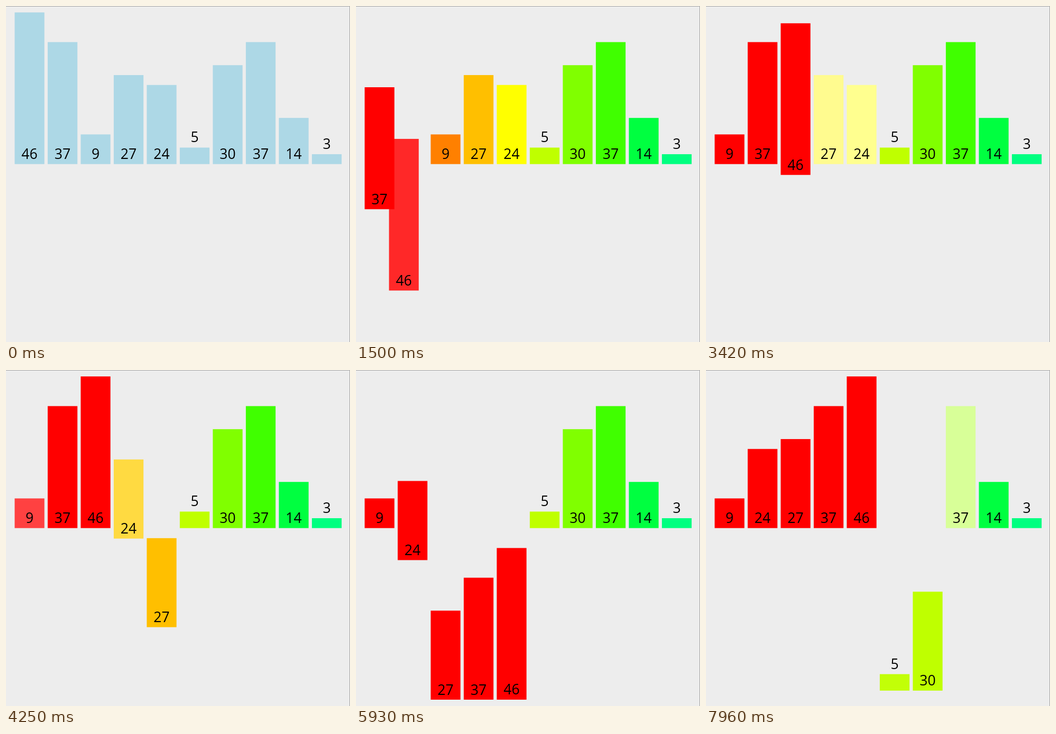
Animation of 651 by 637 pixels, one loop 7990 ms. Source, as an HTML page:

```html
<!DOCTYPE html>
<html lang="en">
<head>
<meta charset="utf-8">
<title>Merge sort</title>
<style>
  html, body { margin: 0; width: 100%; height: 100%; overflow: hidden; background: #ededed; }
  svg { display: block; width: 651px; height: 637px; }
  text { font: 26.5px "Open Sans", "Noto Sans", sans-serif; text-anchor: middle; fill: #000; }
</style>
</head>
<body>
<svg id="stage" viewBox="0 0 651 637">
  <path d="M0 .5H650.5V637" fill="none" stroke="#a3a3a3"/>
</svg>
<script>
const LOOP = 7990, EASE_TIME = 275;
const LEFT = 16.4, PITCH = 62.5, WIDTH = 56.25, UNIT = 6.25, BASE = 299.7, DROP = 325.3;
const values = [46, 37, 9, 27, 24, 5, 30, 37, 14, 3];

const svg = document.getElementById('stage');
function add(parent, name, attrs) {
  const el = document.createElementNS('http://www.w3.org/2000/svg', name);
  for (const key in attrs) el.setAttribute(key, attrs[key]);
  return parent.appendChild(el);
}

const bars = values.map((value, i) => {
  const height = value * UNIT;
  const group = add(svg, 'g', {});
  const rect = add(group, 'rect', { y: -height, width: WIDTH, height });
  const label = add(group, 'text', { x: WIDTH / 2, y: value < 6 ? -height - 10 : -9.5 });
  label.textContent = value;
  return { group, rect, slot: i, down: false, hue: null, glow: false, keys: [] };
});

// Fully saturated colour, lightened when highlighted
function colour({ hue, glow }) {
  if (hue === null) return [173, 216, 230];
  return [0, 240, 120].map(shift => {
    const k = ((hue + shift) % 360) / 60;
    const c = 255 * Math.max(0, Math.min(1, Math.abs(k - 3) - 1));
    return Math.min(255, c + (glow ? 153 : 0));
  });
}

const pose = bar => [
  LEFT + PITCH * bar.slot,
  BASE + (bar.down ? DROP : 0),
  ...colour(bar)
];

const ease = p => p < .5 ? 4 * p ** 3 : 1 - 4 * (1 - p) ** 3;

function poseAt(bar, t) {
  let key = bar.keys[0];
  for (const next of bar.keys) if (next.time <= t) key = next;
  const k = ease(Math.max(0, Math.min(1, (t - key.time) / EASE_TIME)));
  return key.to.map((v, i) => key.from[i] + (v - key.from[i]) * k);
}

// Each step retargets every bar from wherever it is at that moment
function step(time, change) {
  const from = bars.map(bar => poseAt(bar, time));
  change();
  bars.forEach((bar, i) => bar.keys.push({ time, from: from[i], to: pose(bar) }));
}

const glow = (...ids) => ids.forEach(id => bars[id].glow = true);
const lift = (...ids) => ids.forEach(id => bars[id].down = false);
const drop = (id, slot, hue) => Object.assign(bars[id], { slot, hue, down: true, glow: false });

bars.forEach(bar => bar.keys.push({ time: 0, from: pose(bar), to: pose(bar) }));

step(435, () => bars.forEach((bar, i) => bar.hue = 15 * (i < 8 ? i : i + 1)));

step(860, () => { drop(1, 0, 0); glow(0); });
step(1337, () => { drop(0, 1, 0); lift(1); });
step(1795, () => { lift(0); glow(1, 2); });

step(2093, () => drop(2, 0, 0));
step(2293, () => { drop(1, 1, 0); drop(0, 2, 0); });
step(2750, () => lift(2, 1));
step(3215, () => { lift(0); glow(3, 4); });

step(3645, () => { drop(4, 3, 45); drop(3, 4, 45); });
step(3928, () => lift(4));
step(4121, () => { lift(3); glow(2, 4); });

step(4570, () => { drop(2, 0, 0); drop(4, 1, 0); glow(1, 3); });
step(5023, () => { drop(3, 2, 0); drop(1, 3, 0); glow(0); });
step(5490, () => { drop(0, 4, 0); lift(2); });
step(5755, () => lift(4));
step(5950, () => lift(3, 1));
step(6400, () => { lift(0); glow(5, 6); });

step(6860, () => { drop(5, 5, 75); drop(6, 6, 75); });
step(7305, () => lift(5, 6));
step(7558, () => glow(5, 7));
step(7751, () => { drop(5, 5, 75); drop(6, 6, 75); });

function draw(now) {
  const t = now % LOOP;
  for (const bar of bars) {
    const [x, y, ...rgb] = poseAt(bar, t);
    bar.group.setAttribute('transform', `translate(${x} ${y})`);
    bar.rect.setAttribute('fill', `rgb(${rgb.map(Math.round)})`);
  }
}

const start = performance.now();
function tick() {
  draw(performance.now() - start);
  requestAnimationFrame(tick);
}
tick();
</script>
</body>
</html>
```
